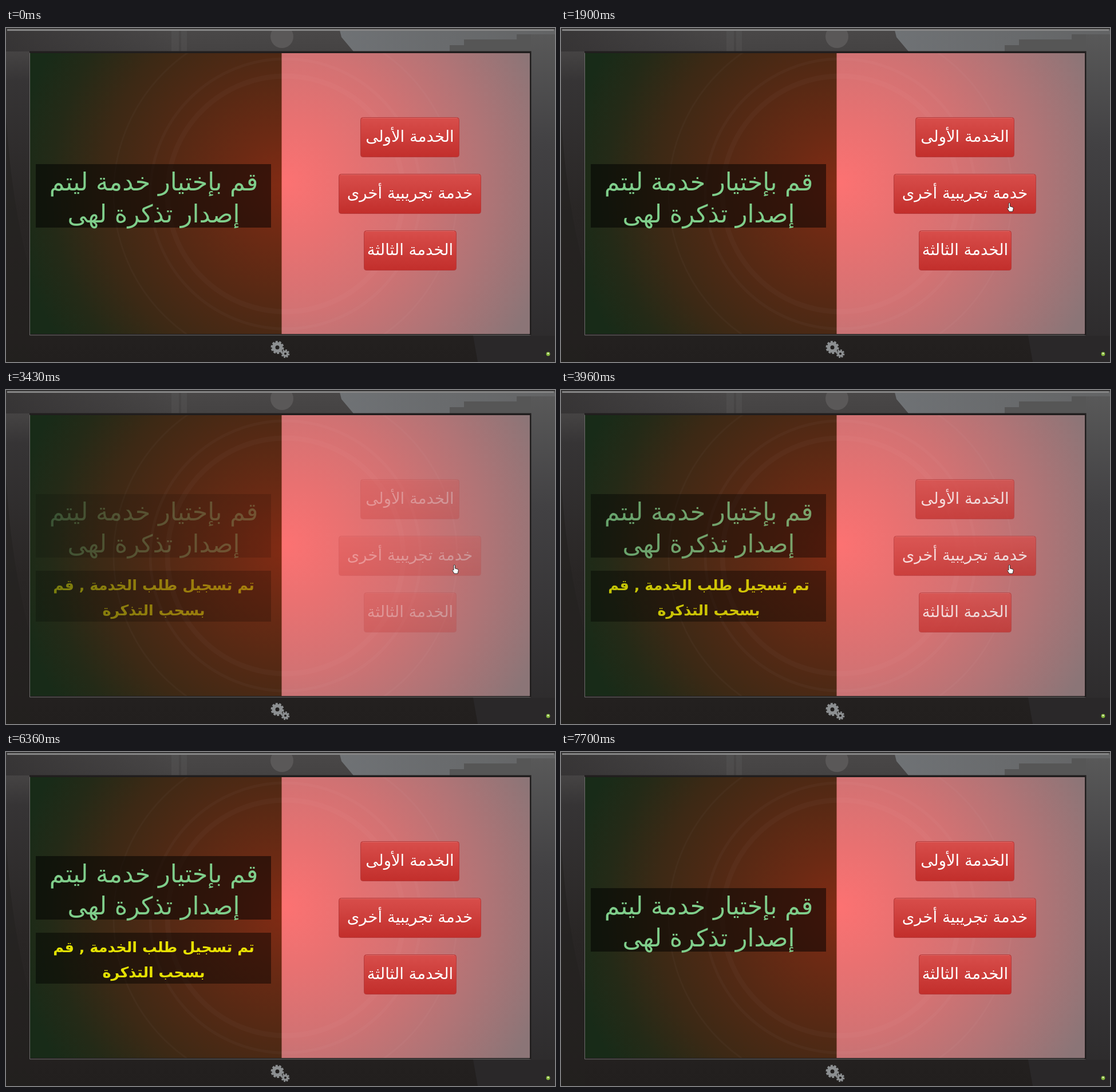
These frames come from a looping animation (959 by 584 pixels, 8.3 s). An HTML page:

```html
<!DOCTYPE html>
<html lang="ar">
<head>
<meta charset="utf-8">
<title>Ticket kiosk</title>
<style>
  html, body { margin: 0; width: 100%; height: 100%; overflow: hidden; background: #242120; }
  svg { display: block; width: 959px; height: 584px; }
  text { font-family: "DejaVu Sans", sans-serif; text-anchor: middle; direction: rtl; }
  #prompt text { font-size: 43px; fill: #7fce8b; }
  #notice text { font-size: 25.5px; font-weight: bold; fill: #ff0; }
  #services text { font-size: 27.5px; fill: #fff; }
  .panel { fill: #000; fill-opacity: .52; }
</style>
</head>
<body>
<svg viewBox="0 0 959 584">
  <defs>
    <linearGradient id="bezel" x2="0" y2="1">
      <stop offset="0" stop-color="#4a4848"/>
      <stop offset=".08" stop-color="#444242"/>
      <stop offset=".16" stop-color="#363435"/>
      <stop offset=".55" stop-color="#292625"/>
      <stop offset="1" stop-color="#221f1e"/>
    </linearGradient>
    <linearGradient id="side" x2="0" y2="1">
      <stop offset="0" stop-color="#5a5a5a"/>
      <stop offset=".35" stop-color="#424143"/>
      <stop offset="1" stop-color="#2b292a"/>
    </linearGradient>
    <linearGradient id="corner">
      <stop offset="0" stop-color="#2c2a2b" stop-opacity=".6"/>
      <stop offset="1" stop-color="#2c2a2b" stop-opacity="0"/>
    </linearGradient>
    <linearGradient id="shine">
      <stop offset="0" stop-color="#6f7275"/>
      <stop offset="1" stop-color="#636465"/>
    </linearGradient>
    <radialGradient id="dark" gradientUnits="userSpaceOnUse" cx="492" cy="280" r="480">
      <stop offset="0" stop-color="#832b14"/>
      <stop offset=".2" stop-color="#6c2a14"/>
      <stop offset=".42" stop-color="#562914"/>
      <stop offset=".68" stop-color="#3c2915"/>
      <stop offset=".86" stop-color="#242a17"/>
      <stop offset="1" stop-color="#182b18"/>
    </radialGradient>
    <radialGradient id="light" gradientUnits="userSpaceOnUse" cx="488" cy="270" r="480">
      <stop offset="0" stop-color="#fc7272"/>
      <stop offset=".22" stop-color="#e97171"/>
      <stop offset=".48" stop-color="#d17273"/>
      <stop offset=".72" stop-color="#b27476"/>
      <stop offset="1" stop-color="#8b7577"/>
    </radialGradient>
    <linearGradient id="red" x2="0" y2="1">
      <stop offset="0" stop-color="#d84e4b"/>
      <stop offset="1" stop-color="#c22e2b"/>
    </linearGradient>
    <clipPath id="screen"><path d="M42 44H915V535H42z"/></clipPath>
  </defs>

  <!-- monitor frame -->
  <path fill="url(#bezel)" d="M0 0H959V584H0z"/>
  <path fill="url(#corner)" d="M0 0H290V41H0z"/>
  <path fill="url(#side)" d="M916 0H959V584H825L816 537H916z"/>
  <path fill="#2a2829" d="M816 538H959V584H824z"/>
  <path fill="#242120" d="M0 150Q8 300 42 430V584H0z" opacity=".55"/>
  <path fill="#fff" opacity=".035" d="M289 4H302V41H289zM306 4H316V41H306z"/>
  <path fill="#565656" d="M770 4H917V41H770z"/>
  <path fill="url(#shine)" d="M583 4H959V11H892V20H800V30H775V41H607L586 16z"/>
  <circle cx="482" cy="15" r="20" fill="#5a5858"/>
  <path fill="#343333" d="M0 0H959V2H0z"/>
  <path fill="#858585" d="M2 2H957V5H2z"/>
  <path fill="#211e1e" stroke="#6e6c6c" d="M41.500 41.500H916.500V537H41.500z"/>
  <path fill="none" stroke="#211e1e" stroke-width="3" d="M41 42H916V537"/>

  <!-- screen -->
  <path fill="url(#dark)" d="M42 44H482V535H42z"/>
  <path fill="url(#light)" d="M481.500 44H915V535H481.500z"/>
  <g clip-path="url(#screen)" fill="none" stroke="#fff" stroke-opacity=".025">
    <circle cx="488" cy="290" r="206" stroke-width="9"/>
    <circle cx="488" cy="290" r="236" stroke-width="5"/>
    <circle cx="488" cy="290" r="300" stroke-width="3"/>
  </g>

  <!-- gears and power light -->
  <g fill="none" stroke="#8c8f91">
    <circle cx="474" cy="558.500" r="6.500" stroke-width="6"/>
    <circle cx="474" cy="558.500" r="10" stroke-width="3" pathLength="20" stroke-dasharray="1.200 .8"/>
    <circle cx="488" cy="569.500" r="3.800" stroke-width="3.500"/>
    <circle cx="488" cy="569.500" r="6.200" stroke-width="2.400" pathLength="16" stroke-dasharray="1.200 .8"/>
  </g>
  <circle cx="947" cy="570" r="3.400" fill="#86b83c"/>
  <circle cx="947" cy="569" r="1.300" fill="#eef5d8"/>

  <g id="prompt">
    <path class="panel" d="M52 238H463V349H52z"/>
    <text x="258" y="284">قم بإختيار خدمة ليتم</text>
    <text x="258" y="340">إصدار تذكرة لهى</text>
  </g>
  <g id="notice">
    <path class="panel" d="M52 316H463V405H52z"/>
    <text x="258" y="350">تم تسجيل طلب الخدمة , قم</text>
    <text x="258" y="394">بسحب التذكرة</text>
  </g>
  <g id="services"></g>

  <g clip-path="url(#screen)">
    <g id="cursor" stroke="#fff" stroke-linejoin="round">
      <path id="arrow" fill="#111" d="M0 0V15L3.500 12 6 18 8.500 17 6 11.300H10.500z"/>
      <path id="hand" fill="#fff" stroke="#222" stroke-width=".9"
        d="M-1 .5Q.3-1 1.500.5V6L6 7.200Q7.500 7.600 7.200 10L6 15H0L-3.300 9.500Q-3 8-1 9z"/>
    </g>
  </g>
</svg>
<script>
const LOOP = 8300, TICK = 200 / 3, TICK_OFFSET = 26;
const $ = id => document.getElementById(id);

const services = [
  { x: 619, y: 156, w: 173, label: 'الخدمة الأولى' },
  { x: 581, y: 255, w: 249, label: 'خدمة تجريبية أخرى' },
  { x: 625, y: 354, w: 162, label: 'الخدمة الثالثة' }
];
$('services').innerHTML = services.map(({ x, y, w, label }) => `<g>
  <rect x="${x + .5}" y="${y + .5}" width="${w - 1}" height="69" rx="4" fill="url(#red)" stroke="#b4393a"/>
  <path d="M${x + 4} ${y + 1.5}h${w - 8}" stroke="#fff" stroke-opacity=".15"/>
  <text x="${x + w / 2}" y="${y + 43}">${label}</text></g>`).join('');
const pressedFace = $('services').children[1].querySelector('rect');

// time, x, y of the pointer tip
const path = [
  [350, 903, 524], [700, 866, 442], [1160, 830, 371], [1890, 783, 306],
  [4430, 783, 306], [4830, 668, 414], [5030, 648, 458], [5560, 645, 536]
];

function pointerAt(t) {
  const i = path.findIndex(p => p[0] > t);
  if (i < 1) return null;
  const [a, b] = [path[i - 1], path[i]];
  const k = (t - a[0]) / (b[0] - a[0]);
  return { x: a[1] + (b[1] - a[1]) * k, y: a[2] + (b[2] - a[2]) * k };
}

const ramp = (t, start, end) => Math.min(1, Math.max(0, (t - start) / (end - start)));
const show = (el, on) => el.setAttribute('visibility', on ? 'inherit' : 'hidden');

function draw(t) {
  const noticeOpen = t > 3150 && t < 7620;
  const fade = t > 3150 ? ramp(t, 3150, 4250) : 1;
  $('prompt').setAttribute('transform', `translate(0 ${noticeOpen ? -56 : 0})`);
  $('prompt').setAttribute('opacity', fade);
  $('services').setAttribute('opacity', fade);
  $('notice').setAttribute('opacity',
    noticeOpen ? ramp(t, 2800, 4400) * (1 - ramp(t, 6160, 7630)) : 0);
  pressedFace.setAttribute('fill', t > 2620 && t < 2750 ? '#b8312d' : 'url(#red)');

  const p = pointerAt(t);
  $('cursor').setAttribute('visibility', p ? 'visible' : 'hidden');
  if (!p) return;
  const hover = services.some(s => p.x > s.x && p.x < s.x + s.w && p.y > s.y && p.y < s.y + 70);
  $('cursor').setAttribute('transform', `translate(${p.x} ${p.y})`);
  show($('hand'), hover);
  show($('arrow'), !hover);
}

const began = performance.now();
function loop() {
  const t = (performance.now() - began) % LOOP;
  draw(Math.floor((t - TICK_OFFSET) / TICK) * TICK + TICK_OFFSET);
  requestAnimationFrame(loop);
}
loop();
</script>
</body>
</html>
```
